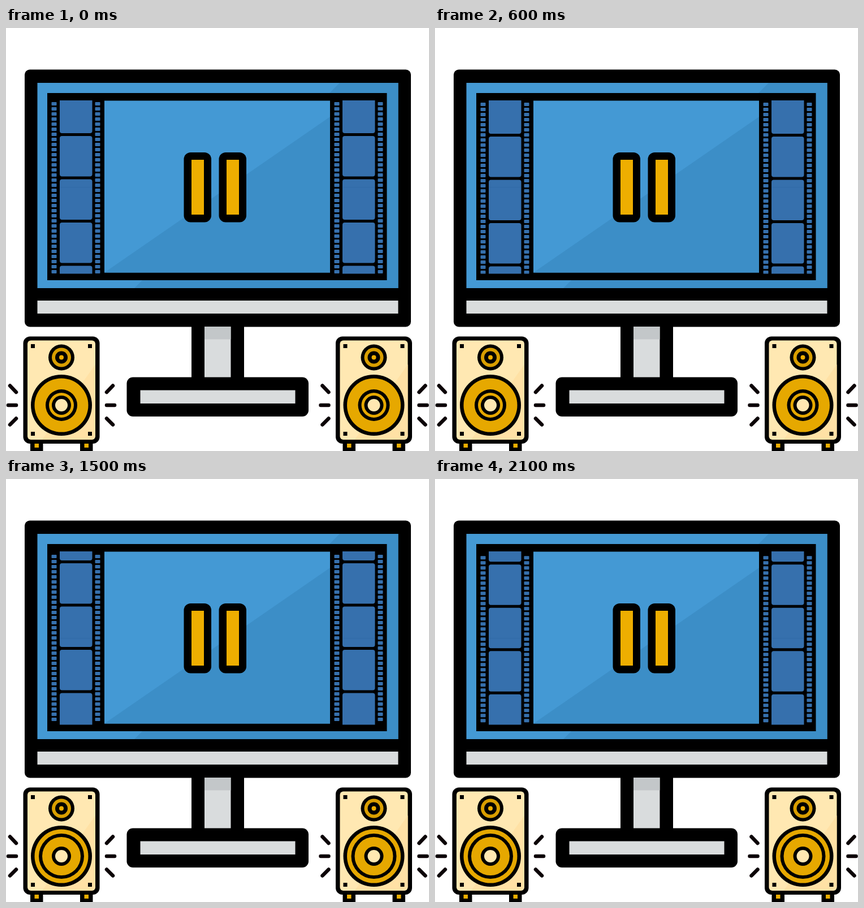
These frames come from a looping animation (748x748 px, 2.4 s). An HTML page with a canvas:

```html
<!DOCTYPE html>
<html lang="en">
<head>
<meta charset="utf-8">
<title>Monitor and speakers</title>
<style>
html, body { margin: 0; width: 100%; height: 100%; overflow: hidden; background: #fff; }
canvas { display: block; width: 748px; height: 748px; }
</style>
</head>
<body>
<canvas id="stage" width="748" height="748"></canvas>
<script>
const ctx = document.getElementById('stage').getContext('2d');
const BLACK = '#000', GOLD = '#eeae00', GREY = '#d9dcdd';
const LIGHT = '#4499d4', SHADE = '#3c8ec7', CELL = '#3670ad';

const STEP = 300;
const SHIFTS = [0, -42, 1, -39.7];   // film position at each step
const CELL_PITCH = 76.5, HOLE_PITCH = 9;

// Boxes are given by their edges: left, top, right, bottom.
function box(color, l, t, r, b, radius = 0) {
  ctx.fillStyle = color;
  ctx.beginPath();
  ctx.roundRect(l, t, r - l, b - t, radius);
  ctx.fill();
}

function disc(color, x, y, r) {
  ctx.fillStyle = color;
  ctx.beginPath();
  ctx.arc(x, y, r, 0, Math.PI * 2);
  ctx.fill();
}

function poly(color, ...points) {
  ctx.fillStyle = color;
  ctx.beginPath();
  points.forEach(([x, y]) => ctx.lineTo(x, y));
  ctx.fill();
}

function line(x1, y1, x2, y2) {
  ctx.beginPath();
  ctx.moveTo(x1, y1);
  ctx.lineTo(x2, y2);
  ctx.stroke();
}

const mod = (a, n) => ((a % n) + n) % n;

function filmStrip(x, shift) {
  ctx.save();
  ctx.beginPath();
  ctx.rect(x, 128, 101, 306.5);
  ctx.clip();
  const cellTop = 128 + mod(191 - 128 + shift, CELL_PITCH) - CELL_PITCH;
  for (let y = cellTop; y < 435; y += CELL_PITCH) {
    box(CELL, x + 22, y, x + 79.5, y + 71.5, 4);
  }
  box('#306aa6', x + 23, 281, x + 79, 282);
  const holeTop = 131 + mod(shift, HOLE_PITCH);
  for (let y = holeTop; y < 431; y += HOLE_PITCH) {
    box(CELL, x + 7.5, y, x + 16.5, y + 6, 1);
    box(CELL, x + 84.5, y, x + 93.5, y + 6, 1);
  }
  ctx.restore();
}

function monitor(shift) {
  box(BLACK, 33, 73.5, 716, 528.5, 9);
  box(LIGHT, 55.5, 97, 693.5, 460);
  poly(SHADE, [590, 97], [693.5, 97], [693.5, 460], [227, 460]);
  box(GREY, 55.5, 482, 693.5, 505);

  box(BLACK, 73, 115, 673.5, 446);
  box(LIGHT, 174, 128.5, 573, 432.5);
  poly(SHADE, [573, 157], [573, 432.5], [174, 432.5]);
  filmStrip(73, shift);
  filmStrip(573, shift);

  for (const x of [314.5, 376.5]) {
    box(BLACK, x, 220, x + 48.5, 343.5, 12);
    box(GOLD, x + 13.5, 233, x + 35.5, 330);
  }

  box(BLACK, 328, 526, 421, 622);
  box(GREY, 351, 528, 397.5, 618.5);
  box('#c3c7c9', 351, 528, 397.5, 550.5);
  box(BLACK, 213.5, 617.5, 535, 687, 11);
  box(GREY, 237.5, 640.5, 511.5, 664);
}

function speaker(x, wide) {
  ctx.save();
  ctx.translate(x, 0);

  for (const foot of [43, 131]) {
    box(BLACK, foot, 730, foot + 22.5, 748);
    box(GOLD, foot + 7.5, 735, foot + 15, 742);
  }
  box(BLACK, 30.5, 545.5, 165.5, 735, 12);
  box('#ffe8b2', 38, 552.5, 158, 728, 6);
  poly('#ffe1a5', [158, 595], [158, 722], [152, 728], [64, 728]);

  for (const sx of [44, 145]) {
    box(BLACK, sx, 559, sx + 7, 566);
    box(BLACK, sx, 714, sx + 7, 721);
  }

  disc(BLACK, 98, 582.5, 23);
  disc('#d99e00', 98, 582.5, 17);
  disc(BLACK, 98, 582.5, 11);
  disc(GOLD, 98, 582.5, 4);

  const ring = wide ? 40 : 28;
  disc(BLACK, 98, 667, 54);
  disc('#e6a800', 98, 667, 47.5);
  disc(BLACK, 98, 667, ring);
  disc('#e6a800', 98, 667, ring - 6);
  disc(BLACK, 98, 667, 17);
  disc('#ffe8b2', 98, 667, 11);

  ctx.strokeStyle = '#0c0306';
  ctx.lineWidth = 6.5;
  ctx.lineCap = 'round';
  for (const side of [-1, 1]) {
    line(98 + side * 80, 644, 98 + side * 91, 632.5);
    line(98 + side * 80, 667, 98 + side * 94, 667);
    line(98 + side * 80, 690.5, 98 + side * 91, 701.5);
  }
  ctx.restore();
}

function draw(ms) {
  const step = Math.floor(ms / STEP) % SHIFTS.length;
  const wide = step % 2 === 1;
  ctx.fillStyle = '#fff';
  ctx.fillRect(0, 0, 748, 748);
  monitor(SHIFTS[step]);
  speaker(0, wide);
  speaker(552.5, wide);
}

let start = null;
function tick(now) {
  if (start === null) start = now;
  draw(now - start);
  requestAnimationFrame(tick);
}
draw(0);
requestAnimationFrame(tick);
</script>
</body>
</html>
```
